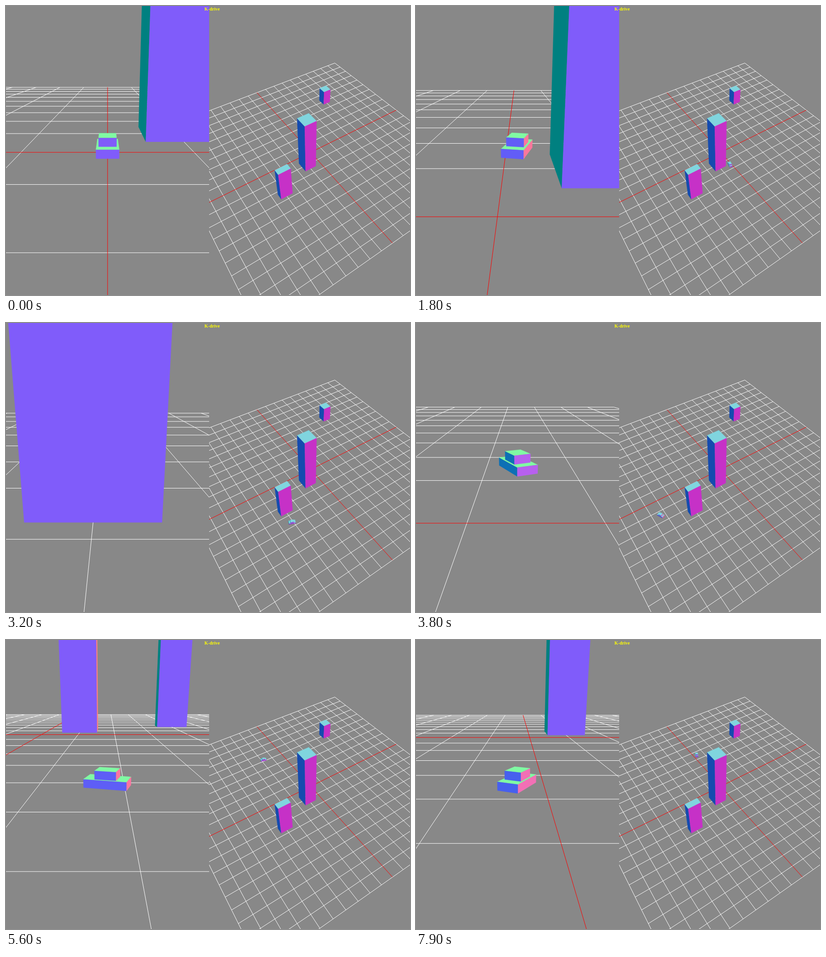
An HTML page that plays this animation: 883x634 px, repeating every 8 s.

```html
<!DOCTYPE html>
<html lang="en">
<head>
<meta charset="utf-8">
<title>K-drive</title>
<style>
html, body { margin: 0; width: 100%; height: 100%; overflow: hidden; background: #888; }
body > svg { display: block; width: 883px; height: 634px; }
path { stroke-linejoin: round; }
text { font: bold 10px "Liberation Serif", serif; fill: #ff0; }
</style>
</head>
<body>
<svg viewBox="0 0 883 634">
  <rect width="883" height="634" fill="#888"/>
  <svg id="chase" width="444" height="634"></svg>
  <svg id="overview" x="444" width="444" height="634"></svg>
  <text x="450.5" y="10" text-anchor="middle">K-drive</text>
</svg>
<script>
const LOOP = 8000, STEP = 100;
const CX = 222, CY = 321, NEAR = 0.5;
const FOCAL = CY / Math.tan(25 * Math.PI / 180);

const dot = (a, b) => a[0] * b[0] + a[1] * b[1] + a[2] * b[2];
const add = (a, b, k = 1) => a.map((v, i) => v + b[i] * k);
const lerp = (a, b, u) => a + (b - a) * u;

// time, x, z, heading, speed per step
const ROUTE = [
  [1500, 0, -9.59, 0, 1.83],
  [1800, 1.355, -15.83, 0.235, 2.35],
  [3200, 41.05, -36.59, 1.95, 4.8],
  [4500, 65.79, 27.43, 3.55, 6.6],
  [5600, 18.05, 51.55, 4.98, 4.5],
  [6600, -3.27, 33.42, 5.35, 0],
  [7900, -3.07, 45.27, 6.738, -2.2]
];
const TURNS = [[1500, 0], [1800, 0.235], [3200, 1.95], [4500, 3.55], [5600, 4.98],
  [6000, 5.48], [6400, 5.45], [6600, 5.35], [7900, 6.738]];

function segment(keys, t) {
  let i = 0;
  while (i < keys.length - 2 && t >= keys[i + 1][0]) i++;
  const [a, b] = [keys[i], keys[i + 1]];
  return [a, b, (t - a[0]) / (b[0] - a[0])];
}

function carAt(t) {
  if (t < 500) return { x: 0, z: 0, heading: 0 };
  if (t < 1500) return { x: 0, z: -0.087 * (t / STEP - 4.5) ** 2, heading: 0 };
  const [a, b, u] = segment(ROUTE, t);
  const steps = (b[0] - a[0]) / STEP;
  const blend = (p, q, v, w) => {
    const s = u * u * (3 - 2 * u);
    return lerp(p, q, s) + steps * u * (1 - u) * ((1 - u) * v - u * w);
  };
  const [h0, h1, k] = segment(TURNS, t);
  return {
    x: blend(a[1], b[1], a[4] * Math.sin(a[3]), b[4] * Math.sin(b[3])),
    z: blend(a[2], b[2], -a[4] * Math.cos(a[3]), -b[4] * Math.cos(b[3])),
    heading: lerp(h0[1], h1[1], k)
  };
}

function box(x, y, z, w, h, d, heading = 0) {
  const c = Math.cos(heading), s = Math.sin(heading);
  return { center: [x, y + h / 2, z], half: [w / 2, h / 2, d / 2],
    axes: [[c, 0, s], [0, 1, 0], [-s, 0, c]] };
}

const TOWERS = [
  [box(10, 0, -10, 10, 50, 10)],
  [box(40, 0, -25, 10, 30, 5)],
  [box(-50, 0, 50, 7.5, 15, 7.5)]
];

function camera(pos, target) {
  const d = add(target, pos, -1), len = Math.hypot(...d);
  const f = d.map(v => v / len), flat = Math.hypot(f[0], f[2]);
  const r = [-f[2] / flat, 0, f[0] / flat];
  const up = [-r[2] * f[1], r[2] * f[0] - r[0] * f[2], r[0] * f[1]];
  const back = f.map(v => -v);
  const turn = v => [dot(v, r), dot(v, up), dot(v, back)];
  return { pos, turn, view: p => turn(add(p, pos, -1)) };
}

const screen = ([x, y, z]) =>
  (CX - FOCAL * x / z).toFixed(2) + ' ' + (CY + FOCAL * y / z).toFixed(2);

// Cut a view-space outline at the near plane
function clip(pts) {
  const out = [];
  pts.forEach((p, i) => {
    const q = pts[(i + 1) % pts.length];
    const inP = p[2] <= -NEAR, inQ = q[2] <= -NEAR;
    if (inP) out.push(p);
    if (inP !== inQ) {
      const u = (-NEAR - p[2]) / (q[2] - p[2]);
      out.push(p.map((v, k) => lerp(v, q[k], u)));
    }
  });
  return out;
}

function outline(cam, pts) {
  const seen = clip(pts.map(cam.view));
  return seen.length > 1 ? 'M' + seen.map(screen).join('L') : '';
}

function gridSvg(cam) {
  let white = '', red = '';
  for (let k = -100; k <= 100; k += 10) {
    const d = outline(cam, [[k, 0, -100], [k, 0, 100]]) + outline(cam, [[-100, 0, k], [100, 0, k]]);
    if (k) white += d; else red += d;
  }
  return `<path d="${white}" fill="none" stroke="#fff"/><path d="${red}" fill="none" stroke="#f00"/>`;
}

function boxSvg(cam, { center, half, axes }) {
  let out = '';
  for (let i = 0; i < 3; i++) for (const side of [-1, 1]) {
    const n = axes[i].map(v => v * side);
    const mid = add(center, n, half[i]);
    if (dot(n, add(cam.pos, mid, -1)) <= 0) continue;
    const j = (i + 1) % 3, k = (i + 2) % 3;
    const corners = [[-1, -1], [1, -1], [1, 1], [-1, 1]].map(([a, b]) =>
      add(add(mid, axes[j], a * half[j]), axes[k], b * half[k]));
    const rgb = `rgb(${cam.turn(n).map(v => Math.round(127.5 * (1 + v)))})`;
    const d = outline(cam, corners);
    // The hairline stroke closes the seam between faces
    if (d) out += `<path d="${d}Z" fill="${rgb}" stroke="${rgb}" stroke-width=".3"/>`;
  }
  return out;
}

function sceneSvg(cam, models) {
  const far = m => Math.hypot(m[0].center[0] - cam.pos[0], m[0].center[2] - cam.pos[2]);
  const sorted = [...models].sort((a, b) => far(b) - far(a));
  return gridSvg(cam) + sorted.flat().map(b => boxSvg(cam, b)).join('');
}

const chase = document.getElementById('chase');
const overview = document.getElementById('overview');
const overCam = camera([100, 200, -150], [0, 0, 0]);

function render(t) {
  const { x, z, heading } = carAt(t);
  const car = [box(x, 0, z, 2.5, 1, 5, heading), box(x, 1, z, 2, 1, 2.5, heading)];
  const models = [...TOWERS, car];
  chase.innerHTML = sceneSvg(camera([x, 10, z + 35], [x, 0, z]), models);
  overview.innerHTML = sceneSvg(overCam, models);
}

let shown = -1;
const start = performance.now();
function tick() {
  const t = Math.floor((performance.now() - start) % LOOP / STEP) * STEP;
  if (t !== shown) render(shown = t);
  requestAnimationFrame(tick);
}
tick();
</script>
</body>
</html>
```
